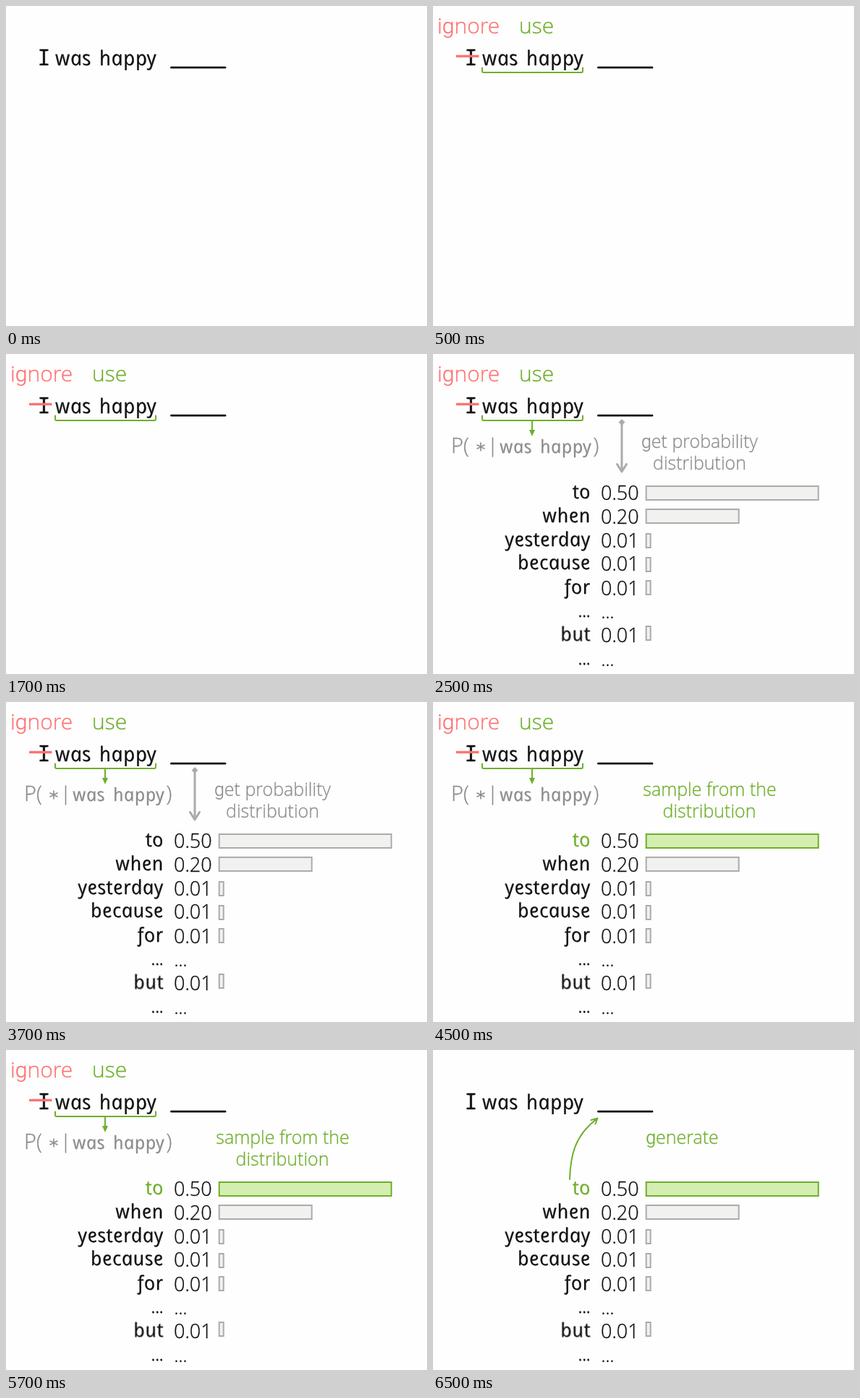
These frames come from a looping animation (582 px wide and 443 px high, 8 s). An HTML page:

```html
<!DOCTYPE html>
<html lang="en">
<head>
<meta charset="utf-8">
<style>
html, body { margin: 0; width: 100%; height: 100%; overflow: hidden; background: #fefefe; }
svg { display: block; width: 582px; height: 443px; }
.light { font-family: "Open Sans", sans-serif; font-weight: 300; stroke-width: .3; }
.loop { font-family: Roboto, sans-serif; }
/* upright italic: round one-storey letters */
.hand { font-family: "Open Sans", sans-serif; font-style: italic; font-weight: 400; letter-spacing: .6px; stroke-width: .3; stroke-linejoin: round; }
.mono { font-family: "Noto Sans Mono", monospace; stroke-width: .5; stroke-linejoin: round; }
</style>
</head>
<body>
<svg id="stage" viewBox="0 0 582 443"></svg>
<script>
const LOOP = 8000;
const INK = '#111', GREEN = '#6fae2c', RED = '#ff7272', GRAY = '#8c8c8c', EDGE = '#ababab';
const stage = document.getElementById('stage');

function add(parent, tag, attrs, text) {
  const el = document.createElementNS('http://www.w3.org/2000/svg', tag);
  for (const k in attrs) el.setAttribute(k, attrs[k]);
  if (text) el.textContent = text;
  parent.append(el);
  return el;
}

// A group that is visible from one time to another
function scene(from = 0, to = LOOP) {
  const g = add(stage, 'g', {});
  const steps = [[0, from ? 0 : 1], [from, 1], [to, 0], [LOOP, 0]];
  if (from || to < LOOP) {
    g.animate(steps.map(([t, opacity]) => ({ offset: t / LOOP, opacity, easing: 'step-end' })),
      { duration: LOOP, iterations: Infinity });
  }
  return g;
}

// Light sans text, with the letter g in its one-storey form
function light(parent, text, x, y, size, fill, anchor = 'start') {
  const el = add(parent, 'text', {
    class: 'light', x, y, 'font-size': size, fill, stroke: fill, 'text-anchor': anchor
  });
  for (const part of text.split(/(g)/)) {
    if (part) add(el, 'tspan', part === 'g' ? { class: 'loop' } : {}, part);
  }
}

const hand = (g, text, x, y, size, fill, anchor = 'start') =>
  add(g, 'text', {
    class: 'hand', 'font-size': size, fill, stroke: fill, 'text-anchor': anchor,
    transform: `translate(${x} ${y}) skewX(12)`
  }, text);

const line = (g, d, stroke, width) =>
  add(g, 'path', {
    d, stroke, fill: 'none', 'stroke-width': width,
    'stroke-linecap': 'round', 'stroke-linejoin': 'round'
  });

const bar = (g, y, width, fill = '#f1f1ef', stroke = EDGE) =>
  add(g, 'rect', { x: 294.7, y, width, height: 19, fill, stroke, 'stroke-width': 2 });

// Sentence
const base = scene();
add(base, 'text', {
  class: 'mono', x: 52.5, y: 82, 'font-size': 30, fill: INK, stroke: INK, 'text-anchor': 'middle'
}, 'I');
hand(base, 'was', 70, 82, 28, INK);
hand(base, 'happy', 130.5, 82, 28, INK);
line(base, 'M228.5 85.2H303', INK, 2.8);

// Context choice
const context = scene(500, 6500);
light(context, 'ignore', 6, 38, 30, RED);
light(context, 'use', 119, 38, 30, GREEN);
add(context, 'path', { d: 'M32 69.5H63.5', stroke: RED, 'stroke-width': 3.4 });
line(context, 'M68 85.5V90Q68 92 70 92H205Q207 92 207 90V85.5', GREEN, 2);

// Conditional probability
const cond = scene(2500, 6500);
line(cond, 'M137 92V107', GREEN, 2);
add(cond, 'path', { d: 'M133 105H141L137 114Z', fill: GREEN });
light(cond, 'P(', 25, 137, 29, GRAY);
line(cond, 'M66 123V134M61 126L71 131M71 126L61 131', GRAY, 1.6);
line(cond, 'M82.5 116V142', GRAY, 1.6);
hand(cond, 'was', 94, 137, 25, GRAY);
hand(cond, 'happy', 149.5, 137, 25, GRAY);
light(cond, ')', 221.5, 137, 29, GRAY);

// Distribution table
const table = scene(2500);
const rows = [
  ['when', '0.20', 233, 215, 128],
  ['yesterday', '0.01', 266, 249, 6],
  ['because', '0.01', 298, 282, 6],
  ['for', '0.01', 332, 314, 6],
  ['but', '0.01', 397, 377, 6]
];
for (const [word, prob, y, top, width] of rows) {
  hand(table, word, 219.5, y, 27, INK, 'end');
  light(table, prob, 232, y + 1.5, 27, INK);
  bar(table, top, width);
}
light(table, '0.50', 232, 201.5, 27, INK);
for (const y of [364, 430]) {
  hand(table, '...', 219, y, 20, INK, 'end');
  light(table, '...', 232.5, y + 2, 25, INK);
}

// Top row before and after sampling
const plain = scene(2500, 4500);
hand(plain, 'to', 219.5, 200, 27, INK, 'end');
bar(plain, 183, 238);
add(plain, 'path', { d: 'M261 90L265.5 94.5L261 99L256.5 94.5Z', fill: EDGE });
line(plain, 'M261 95V162M254.5 152.5L261 163L267.5 152.5', EDGE, 3);
light(plain, 'get probability', 368.5, 130, 25, GRAY, 'middle');
light(plain, 'distribution', 368.5, 160, 25, GRAY, 'middle');

const picked = scene(4500);
hand(picked, 'to', 219.5, 200, 27, GREEN, 'end');
bar(picked, 183, 238, '#d4eeb2', GREEN);

const sample = scene(4500, 6500);
light(sample, 'sample from the', 382.5, 130, 25, GREEN, 'middle');
light(sample, 'distribution', 382, 160, 25, GREEN, 'middle');

const generate = scene(6500);
light(generate, 'generate', 344.5, 130, 25, GREEN, 'middle');
line(generate, 'M189 179C190 146 196 118 227 95M218.5 97L227.5 94.5L224.5 102.5', GREEN, 2);
</script>
</body>
</html>
```
